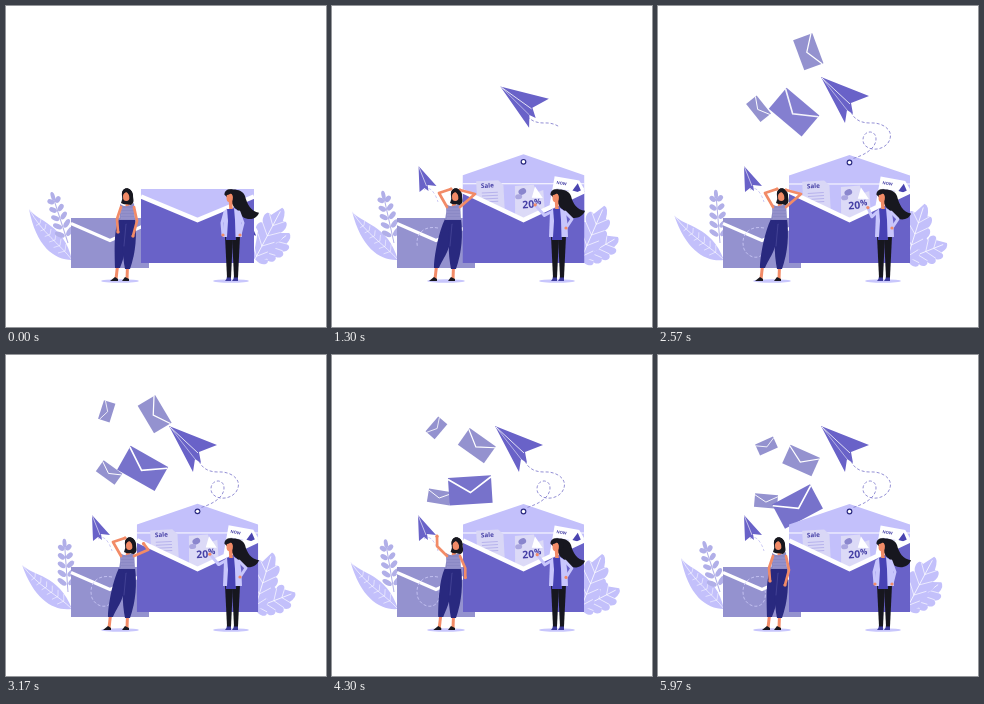
An HTML page with a canvas that plays this animation: 320 px wide and 321 px high, repeating every 6010 ms.

```html
<!DOCTYPE html>
<html lang="en">
<head>
<meta charset="utf-8">
<title>Mail campaign</title>
<style>
html, body { margin: 0; width: 100%; height: 100%; overflow: hidden; background: #fff; }
canvas { display: block; width: 320px; height: 321px; }
</style>
</head>
<body>
<canvas id="stage"></canvas>
<script>
const LOOP = 6010;
const canvas = document.getElementById('stage');
const ratio = window.devicePixelRatio || 1;
canvas.width = 320 * ratio;
canvas.height = 321 * ratio;
const c = canvas.getContext('2d');

const INDIGO = '#6962c8', LILAC = '#c3c0fb', MUTED = '#9492cf', NAVY = '#29297f';
const SKIN = '#f28b67', BLACK = '#17171f', WHITE = '#fff', COAT = '#c8c6fc';

const clamp = v => Math.max(0, Math.min(1, v));
const smooth = p => p * p * (3 - 2 * p);
const mix = (a, b, p) => a + (b - a) * p;
const ramp = (t, from, to) => smooth(clamp((t - from) / (to - from)));
const hump = (t, peak, reach) => smooth(clamp(1 - Math.abs(t - peak) / reach));

// Moves from the first pose to each later one in its [pose, from, to] span.
function pose(t, first, ...moves) {
  return moves.reduce((now, [next, from, to]) =>
    now.map((v, i) => mix(v, next[i], ramp(t, from, to))), first);
}

function at(x, y, deg, scale, draw) {
  c.save();
  c.translate(x, y);
  c.rotate(deg * Math.PI / 180);
  c.scale(scale, scale);
  draw();
  c.restore();
}
function trace(points) {
  c.beginPath();
  for (let i = 0; i < points.length; i += 2) c.lineTo(points[i], points[i + 1]);
}
function poly(color, ...points) {
  trace(points);
  c.fillStyle = color;
  c.fill();
}
function line(color, width, ...points) {
  trace(points);
  c.strokeStyle = color;
  c.lineWidth = width;
  c.stroke();
}
function oval(color, x, y, rx, ry = rx, turn = 0) {
  c.beginPath();
  c.ellipse(x, y, rx, ry, turn, 0, 7);
  c.fillStyle = color;
  c.fill();
}
function shape(color, d) {
  c.fillStyle = color;
  c.fill(new Path2D(d));
}
function label(text, size, x, y) {
  c.font = `bold ${size}px "Open Sans", sans-serif`;
  c.textAlign = 'center';
  c.fillStyle = '#4640a6';
  c.fillText(text, x, y);
}

function broadLeaf(sway) {
  at(66, 254, -8.5 * sway, 1, () => {
    shape(LILAC, 'M0 0 C-18 0 -36 -14 -43 -51 C-34 -38 -8 -36 0 0Z');
    c.strokeStyle = WHITE;
    c.lineWidth = .6;
    c.stroke(new Path2D('M0 0 C-12 -16 -30 -27 -43 -51'));
    for (let i = 0; i < 6; i++) {
      const x = -7 - i * 5, y = -9 - i * 5.5;
      line(WHITE, .5, x - 7 + i * .6, y + 2, x, y, x + 1, y - 7 + i * .5);
    }
  });
}

function sprig(sway) {
  at(62, 237, -18 + 14 * sway, 1, () => {
    const color = '#b1afe8';
    line(color, 1, 0, 0, 0, -48);
    for (let i = 0; i < 5; i++) {
      const y = -7 - i * 8.5, size = 5.2 - i * .4;
      for (const side of [-1, 1]) oval(color, side * size, y - 3.5, size, 2.5, side * -.7);
    }
    oval(color, 0, -49, 2, 4.5);
  });
}

function lobedLeaf(turn, length, width) {
  at(249, 253, turn, 1, () => {
    const step = length / 5;
    const reach = i => width * (1 - Math.abs(i - 1.8) * .13);
    c.beginPath();
    c.moveTo(0, 0);
    for (const side of [1, -1]) {
      for (let n = 0; n < 4; n++) {
        const i = side > 0 ? n : 3 - n, w = side * reach(i);
        const low = -i * step, high = -(i + 1.4) * step;
        const [first, second, end] = side > 0 ? [low, high, i + 1] : [high, low, i];
        c.bezierCurveTo(w * 1.3, first, w * 1.3, second, end && w * .62, -end * step);
      }
      if (side > 0) c.quadraticCurveTo(width * .4, -length, 0, -length);
      c.lineTo(side > 0 ? -width * .5 : 0, side > 0 ? -4 * step : 0);
    }
    c.fillStyle = LILAC;
    c.fill();
    line(WHITE, .7, 0, 0, 0, -length + 4);
    for (let i = 0; i < 4; i++) {
      const y = -i * step - 3, w = reach(i) * .8;
      line(WHITE, .6, -w, y - step * .8, 0, y, w, y - step * .8);
    }
  });
}

function smallMail() {
  c.fillStyle = MUTED;
  c.fillRect(65, 212, 78, 50);
  line(WHITE, 3, 65, 217.5, 104, 234.5, 143, 217.5);
}

const drifting = [
  { w: 19.5, h: 12, color: MUTED, start: 2550, from: [100, 53, -77], to: [108.5, 91, -24] },
  { w: 32, h: 20.5, color: MUTED, start: 1950, from: [151, 40, 74], to: [143, 105.5, 24] },
  { w: 23, h: 13.5, color: MUTED, start: 1450, from: [98, 88, 67], to: [108, 146, 5] },
  { w: 43, h: 27.5, color: '#7772cb', start: 2250, from: [136, 105, 42], to: [139.5, 151.5, -28] }
];
function drift(t) {
  for (const { w, h, color, start, from, to } of drifting) {
    const [x, y, turn] = pose(t, from, [to, start, start + 3400]);
    c.globalAlpha = clamp((t - start - 50) / 300);
    at(x, y, turn, 1, () => {
      c.fillStyle = color;
      c.fillRect(-w / 2, -h / 2, w, h);
      line(WHITE, w / 26, -w / 2, -h / 2 + 1.5, 0, h * .08, w / 2, -h / 2 + 1.5);
    });
  }
  c.globalAlpha = 1;
}

function trail(d, color, shown, length) {
  if (shown <= 0) return;
  const mask = [];
  for (let used = 0; used < length * shown; used += 5) mask.push(3, 2);
  c.save();
  c.setLineDash([...mask, 0, 999]);
  c.strokeStyle = color;
  c.lineWidth = .9;
  c.stroke(new Path2D(d));
  c.restore();
}

function planes(t) {
  const left = clamp(1 - t / 1500);
  trail('M193 106 C196 113 202 117 212 117 C225 116 238 125 230 137 C222 147 205 144 205 134 C205 124 218 123 218 133 C218 143 205 150 193 153',
    '#8783d0', clamp((t - 1000) / 1100), 145);
  at(163 + 40 * left, 71 + 71 * left, -55 * left, 1 - left ** 1.75, () => {
    poly(INDIGO, 0, 0, 48, 19, 30, 26, 32, 37, 26, 33, 24, 46);
    line(WHITE, .8, 1, 1, 29, 27);
    line(WHITE, .5, 1, 1, 26, 33);
  });

  trail('M92 184 C97 179 103 186 106 196 M106 222 C90 219 82 230 86 243 C91 254 105 254 107 243 C109 234 104 229 101 236',
    '#c8c6f4', clamp((t - 1000) / 700), 75);
  at(86 + 4 * left, 160 + 45 * left ** 3, -20 * left ** 3, 1 - left ** 3, () => {
    poly(INDIGO, 0, 0, 18, 20, 9, 19, 10, 25, 6, 22, 1, 26);
    line(WHITE, .6, 0, 0, 8, 20);
  });
}

const swell = t => hump(t, 870, 550) + hump(t, 3670, 550);

function papers(t) {
  const sink = end => 42 * (1 - ramp(t, 0, end)) - 8 * swell(t);
  const grow = 1 + .1 * hump(t, 3670, 550);
  at(158, 191 + sink(1400), -3, grow, () => {
    poly('#d9d7f6', -13, -16, 9, -16, 14, -11, 14, 18, -13, 18);
    label('Sale', 6.3, -2, -9);
    for (let y = -4; y < 6; y += 3) line('#b6b2ec', 1, -8, y, 8, y);
  });
  at(197, 196 + sink(900), -4, grow, () => {
    poly('#dcdaf7', -13, -16, 6, -16, 8, -8, 15, -10, 15, 16, -15, 16);
    oval('#8a86cd', -6, -10, 4, 3, -.4);
    oval('#aaa6e0', -10, -5, 3.5, 2.5);
    poly(WHITE, 7, -14, 14, -2, 3, -3);
    label('20', 10.5, -1, 7);
    label('%', 8, 8.5, 4);
  });
  at(235, 187 + sink(1400), 10, grow, () => {
    poly(WHITE, -15, -14, 10, -14, 16, -7, 16, 15, -15, 15);
    label('NOW', 4, -7, -7);
    poly('#4a44b0', 9, -11, 15, -2, 5, -3);
    line('#c9c6f5', .8, -11, -2, 2, -2);
  });
}

function bigMail(t) {
  const open = ramp(t, 0, 700), extra = swell(t);
  const half = 56.5 + 4 * open + 2 * extra, top = 183 - 5 * open - 2 * extra;
  const l = 191.5 - half, r = 191.5 + half;
  const shoulder = top - 8.5 * open, apex = top - 29 * open - 4 * extra;
  poly(LILAC, l, 220, l, shoulder, 191.5, apex, r, shoulder, r, 220);
  if (open > .1) {
    line(WHITE, 1, l, top, r, top);
    oval(NAVY, 191.5, apex + 7.5, 2.9);
    oval(WHITE, 191.5, apex + 7.5, 1.7);
  }
  papers(t);
  const edge = top + 7.5;
  poly(INDIGO, l, edge, 191.5, 214, r, edge, r, 257, l, 257);
  line(WHITE, 4.6, l, edge, 191.5, 214, r, edge);
}

function arm(x, y, [ex, ey, hx, hy], sleeve, width) {
  line(sleeve, width, x, y, ex, ey, hx, hy);
  oval(SKIN, hx, hy, 1.6);
}

function firstWoman(t) {
  const downL = [111, 213, 112, 226], downR = [131, 215, 127, 230];
  const left = pose(t, downL, [[107, 187, 119, 183], 100, 750], [[104, 194, 96, 180], 3900, 4600], [downL, 5150, 5850]);
  const right = pose(t, downR, [[143, 188, 128, 184], 100, 800], [[141, 207, 155, 197], 2950, 3500], [downR, 3850, 4500]);
  const spread = ramp(t, 100, 750) - ramp(t, 3900, 4600);
  const throwing = ramp(t, 3900, 4600) - ramp(t, 5150, 5850);
  const foot = 110 - 7 * spread, head = 121 + 3 * spread + 4 * throwing;

  oval(COAT, 114, 275, 19, 1.8);
  line(SKIN, 3, foot + 1.5, 260, foot, 273);
  line(SKIN, 3, 121.5, 260, 121, 273);
  poly(BLACK, foot - 1, 271, foot + 2, 273, foot + 2, 275, foot - 6, 275);
  poly(BLACK, 119, 271, 123, 273, 123, 275, 116, 275);
  shape(NAVY, `M113 213 C107 225 ${foot - 1} 250 ${foot - 1} 262 H${foot + 4} C${foot + 9} 250 119 245 120 222 L129 213Z`);
  shape(NAVY, 'M118 213 H129 C131 228 130 246 124 263 H119 C116 248 116 230 118 213Z');
  line('#5a59a8', .5, 120, 218, 118, 240);

  line(SKIN, 4, head * .5 + 61, 192, 121.5, 201);
  shape('#8b89c5', 'M114 198 Q121 203 128 197 L129 214 H113 Q115 206 114 198Z');
  for (let y = 203; y < 213; y += 3) line('#a5a3d5', .6, 115, y, 128, y);
  at(head, 190, 0, 1, () => shape(BLACK, 'M-5 -1 C-6 -10 5 -10 6 -1 C6 4 8 6 4 9 C0 8 -3 9 -6 7 Q-4 3 -5 -1Z'));
  arm(115, 201, left, SKIN, 2.7);
  arm(128, 201, right, SKIN, 2.7);
  at(head, 190, 0, 1, () => {
    oval(SKIN, -.7, .5, 3.3, 4.6);
    shape(BLACK, 'M-5 0 C-6 -10 5 -10 6 0 L3 3 Q2 -3 -1 -4 Q-3 -3 -5 0Z');
  });
}

function secondWoman(t) {
  const downL = [216, 217, 217, 229], downR = [237, 217, 234, 229];
  const beat = Math.cos((t - 870) / 2800 * Math.PI * 2);
  const wave = [213 - beat, 210 - beat, 206 - 5 * beat, 200 - 2 * beat];
  const left = pose(t, downL, [wave, 0, 750], [downL, 5200, 5900]);
  const right = pose(t, downR, [[240, 213, 234, 222], 0, 700], [downR, 4200, 4900]);
  const lift = -2 * beat;

  oval(COAT, 225, 275, 18, 1.8);
  for (const x of [221, 228]) {
    shape('#3d3b9c', `M${x} 270 H${x + 4} V275 H${x - 2} Q${x} 273 ${x} 270Z`);
    poly(BLACK, x - 2, 230, x + 6, 230, x + 4, 271.5, x, 271.5);
  }
  shape(BLACK, `M219 189 C218 182 236 181 239 190 C241 198 245 ${205 + lift} 253 ${206 + lift} C250 ${215 + lift} 236 215 232 205 Q227 201 225 196Z`);
  line(SKIN, 3.5, 224.5, 195, 225, 203);
  shape('#4742b4', 'M220 203 H231 L230 234 H220Z');
  shape(COAT, 'M221 202 L218 206 L217 231 H221 L222 215Z');
  shape(COAT, 'M228 202 L234 206 Q236 218 236 231 H229.5 L229 214Z');
  arm(219, 206, left, COAT, 3);
  arm(233, 206, right, COAT, 3);
  oval(SKIN, 223.7, 191.7, 3.2, 4.6);
  shape(BLACK, 'M218.5 189 C218 181 231 181 232 191 L228 196 Q228 189 225 187.5 Q221 190 218.5 189Z');
}

function frame(t) {
  const sway = (1 - Math.cos(t / LOOP * Math.PI * 2)) / 2;
  c.setTransform(ratio, 0, 0, ratio, 0, 0);
  c.fillStyle = WHITE;
  c.fillRect(0, 0, 320, 321);
  c.lineCap = 'butt';
  c.lineJoin = 'miter';
  broadLeaf(sway);
  sprig(sway);
  lobedLeaf(53 + 16 * sway, 43, 13);
  lobedLeaf(28 - 11 * sway, 58, 13);
  drift(t);
  smallMail();
  bigMail(t);
  planes(t);
  c.lineCap = c.lineJoin = 'round';
  firstWoman(t);
  secondWoman(t);
}

const start = performance.now();
function tick() {
  frame((performance.now() - start) % LOOP);
  requestAnimationFrame(tick);
}
tick();
</script>
</body>
</html>
```
